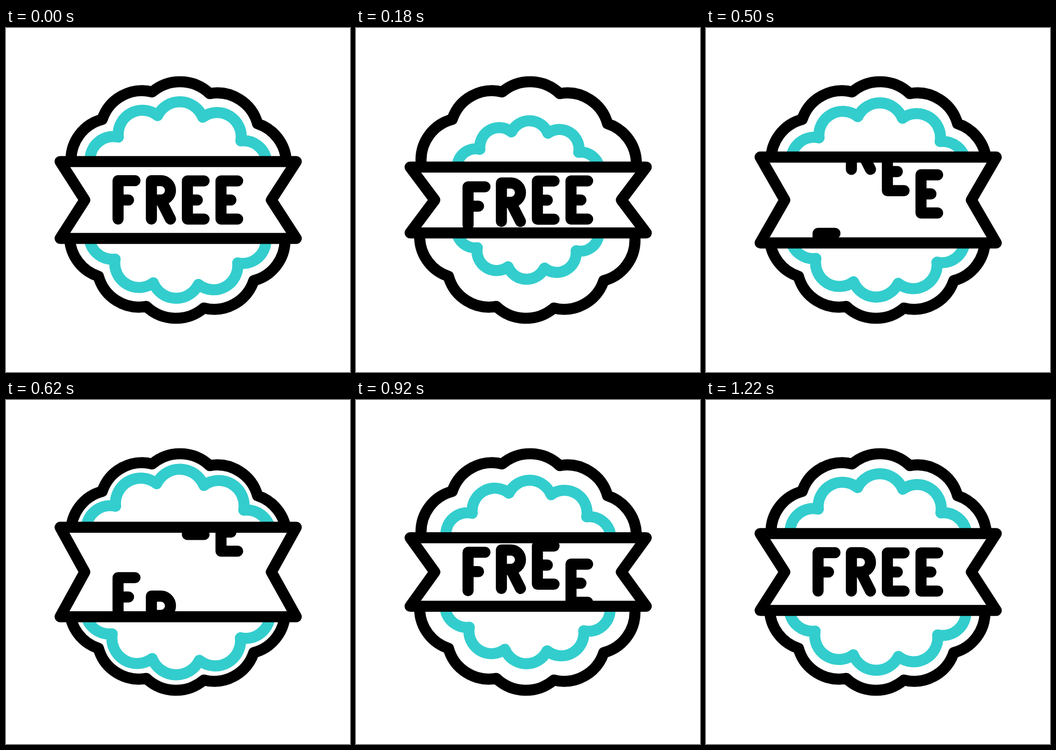
Animation, 640 px wide and 640 px high, one loop 1.8 s. Source, as an HTML page:

```html
<!DOCTYPE html>
<html lang="en">
<head>
<meta charset="utf-8">
<title>Free badge</title>
<style>
  html, body { margin: 0; width: 100%; height: 100%; overflow: hidden; background: #fff; }
  svg { display: block; width: 640px; height: 640px; }
  path { fill: none; stroke: #000; stroke-width: 20.6; stroke-linecap: round; stroke-linejoin: round; vector-effect: non-scaling-stroke; }
  #ring path { stroke: #33cdcd; }
  #band { fill: #fff; }
</style>
</head>
<body>
<svg viewBox="0 0 640 640" role="img" aria-label="FREE">
  <defs>
    <clipPath id="window"><rect id="slot" x="100" width="440"/></clipPath>
    <path id="rim" d="M121 262V248A78 78 0 0 1 179 170A78 78 0 0 1 272 119A80 80 0 0 1 379 122A78 78 0 0 1 468 178A78 78 0 0 1 521.5 248V262"/>
  </defs>
  <use href="#rim"/>
  <use href="#rim" transform="rotate(180 320 320)"/>
  <g id="ring">
    <path d="M156.5 262V246A43 43 0 0 1 209 203A45 45 0 0 1 282 163A46 46 0 0 1 366 166A45 45 0 0 1 437 210A43 43 0 0 1 484.5 246V262"/>
    <path transform="rotate(180 320 320)" d="M156.5 262V246A43 43 0 0 1 209 203A45 45 0 0 1 282 163A46 46 0 0 1 366 166A45 45 0 0 1 437 210A43 43 0 0 1 484.5 246V262"/>
  </g>
  <path id="band"/>
  <g clip-path="url(#window)">
    <path class="letter" d="M240 284H208.5V355.5M208.5 320H228"/>
    <path class="letter" d="M270.5 355.5V284H288A18 18 0 0 1 288 320H270.5M288 320L306 355.5"/>
    <path class="letter" d="M368.5 284.5H337.5V355.5H368.5M337.5 320H356"/>
    <path class="letter" d="M431 284.5H400V355.5H431M400 320H418.5"/>
  </g>
</svg>
<script>
const LOOP = 1800, STAGGER = 80, MID = 320;

const linear = u => u;
const easeIn = u => u * u;
const easeOut = u => u * (2 - u);
const smooth = u => u * u * (3 - 2 * u);

// Steps: [time, value, easing towards this step]
const RING = [[0, 1], [168, .806, smooth], [668, 1.052, smooth], [888, .932, smooth], [1220, 1, smooth]];
const BAND = [[0, 71.5], [152, 61, smooth], [615, 83.2, smooth], [975, 62.5, smooth], [1220, 71.5, smooth]];
// Each letter leaves at the top, then jumps below and comes back in
const LEAVE = [[0, 0], [168, 12, easeIn], [500, -110, smooth]];
const ENTER = [[480, 107], [760, -13, linear], [970, 0, easeOut]];

function sample(steps, t) {
  if (t <= steps[0][0]) return steps[0][1];
  for (let i = 1; i < steps.length; i++) {
    const [t0, v0] = steps[i - 1], [t1, v1, ease] = steps[i];
    if (t < t1) return v0 + (v1 - v0) * ease((t - t0) / (t1 - t0));
  }
  return steps[steps.length - 1][1];
}

const ring = document.getElementById('ring');
const band = document.getElementById('band');
const slot = document.getElementById('slot');
const letters = document.querySelectorAll('.letter');

function draw(t) {
  const s = sample(RING, t);
  ring.setAttribute('transform', `translate(${MID} ${MID}) scale(${s}) translate(${-MID} ${-MID})`);

  const h = sample(BAND, t), top = MID - h, bottom = MID + h;
  band.setAttribute('d', `M100.7 ${top}H540L493.7 ${MID}L540 ${bottom}H100.7L146.5 ${MID}Z`);
  slot.setAttribute('y', top);
  slot.setAttribute('height', 2 * h);

  letters.forEach((letter, i) => {
    const local = t - i * STAGGER;
    const y = sample(local < 480 ? LEAVE : ENTER, local);
    letter.setAttribute('transform', `translate(0 ${y})`);
  });
}

const start = performance.now();
function tick() {
  draw((performance.now() - start) % LOOP);
  requestAnimationFrame(tick);
}
tick();
</script>
</body>
</html>
```
